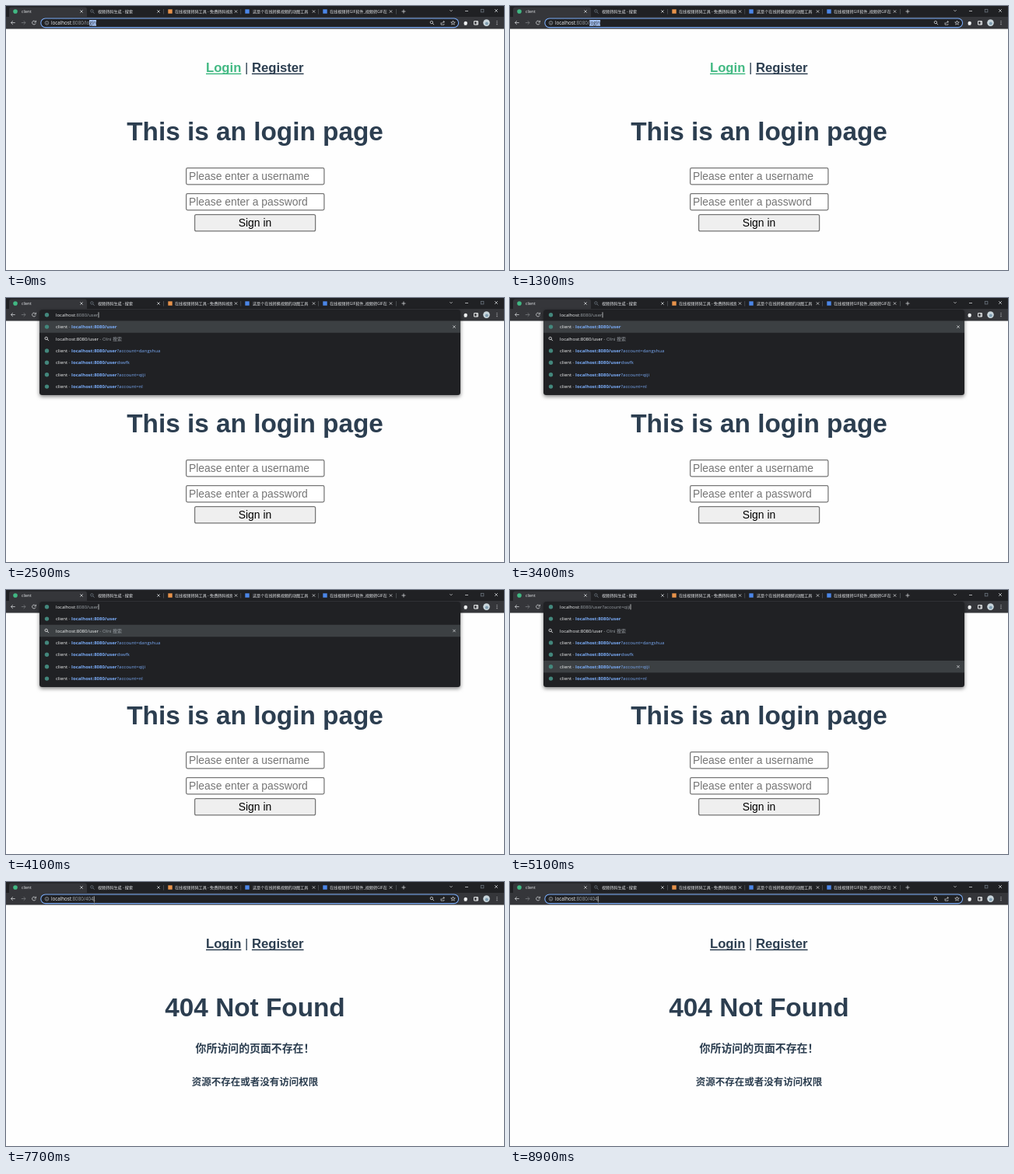
These frames come from a looping animation (640 px wide and 340 px high, 9000 ms). An HTML page with a canvas:

```html
<!DOCTYPE html>
<html lang="en">
<head>
<meta charset="utf-8">
<title>Login routing demo</title>
<style>
html, body { margin: 0; width: 100%; height: 100%; overflow: hidden; background: #fefefe; }
canvas { display: block; width: 640px; height: 340px; }
</style>
</head>
<body>
<canvas id="stage" width="640" height="340"></canvas>
<script>
const ctx = document.getElementById('stage').getContext('2d');
const LOOP = 9000;
const PAGE_FONT = '"Liberation Sans", Arial, sans-serif';
const UI_FONT = '"Open Sans", "Noto Sans CJK SC", sans-serif';
const CJK_FONT = '"Noto Sans CJK SC", "Noto Sans CJK", sans-serif';
const INK = '#2c3e50', GREEN = '#42b983', DARK = '#202124', BAR = '#35363a';
const WHITE = '#f1f3f4', GREY = '#9aa0a6', LINK = '#7aacf8', ICON = '#cfd1d4';
const HOST = 'localhost', PORT = ':8080/';
const ROW_H = 15.4;

// Time at which each typed prefix or arrow-key choice takes effect.
const TYPING = [[1500, 'u'], [1800, 'us'], [2100, 'use'], [2400, 'user']];
const ARROWS_START = 4000, ARROW_STEP = 200, LAST_CHOICE = 4;
const ENTER = 5300, REFOCUS = 7500;

function text(str, x, y, size, color, family = UI_FONT, weight = 400, align = 'left') {
  ctx.font = `${weight} ${size}px ${family}`;
  ctx.fillStyle = color;
  ctx.textAlign = align;
  ctx.fillText(str, x, y);
  return ctx.measureText(str).width;
}

// Draws [string, colour, weight] runs one after another; returns the end x.
function runs(parts, x, y, size) {
  for (const [str, color, weight] of parts) x += text(str, x, y, size, color, UI_FONT, weight);
  return x;
}

function rect(x, y, w, h, color) {
  ctx.fillStyle = color;
  ctx.fillRect(x, y, w, h);
}

function roundBox(x, y, w, h, r, fill, stroke, width = 1) {
  ctx.beginPath();
  ctx.roundRect(x, y, w, h, r);
  if (fill) { ctx.fillStyle = fill; ctx.fill(); }
  if (stroke) { ctx.strokeStyle = stroke; ctx.lineWidth = width; ctx.stroke(); }
}

function dot(x, y, r, color) {
  ctx.beginPath();
  ctx.arc(x, y, r, 0, Math.PI * 2);
  ctx.fillStyle = color;
  ctx.fill();
}

function ring(x, y, r, color, from = 0, to = Math.PI * 2) {
  ctx.beginPath();
  ctx.arc(x, y, r, from, to);
  ctx.strokeStyle = color;
  ctx.lineWidth = 0.8;
  ctx.stroke();
}

function path(d, x, y, color, width = 0.8) {
  ctx.save();
  ctx.translate(x, y);
  ctx.strokeStyle = color;
  ctx.lineWidth = width;
  ctx.stroke(new Path2D(d));
  ctx.restore();
}

function cross(x, y, r, color) {
  path(`M${-r} ${-r}L${r} ${r}M${r} ${-r}L${-r} ${r}`, x, y, color);
}

function magnifier(x, y, color) {
  ring(x - 0.6, y - 0.6, 1.7, color);
  path('M.7 .7L2.6 2.6', x, y, color, 0.9);
}

function underlined(str, x, y, color) {
  const w = text(str, x, y, 16.67, color, PAGE_FONT, 700);
  rect(x, y + 1.6, w, 1.5, color);
  return x + w;
}

function drawNav(active) {
  const gap = 4.63, y = 85;
  let x = underlined('Login', 257, y, active ? GREEN : INK) + gap;
  x += text('|', x, y, 16.67, INK, PAGE_FONT) + gap;
  underlined('Register', x, y, INK);
}

function heading(str) {
  text(str, 320, 173, 33.33, INK, PAGE_FONT, 700, 'center');
}

function input(y, hint) {
  roundBox(231.6, y + 0.6, 177.3, 21.3, 1.8, '#fff', '#767676', 1.25);
  text(hint, 235, y + 16, 13.89, '#757575', PAGE_FONT);
}

function drawLogin() {
  drawNav(true);
  heading('This is an login page');
  input(208, 'Please enter a username');
  input(241, 'Please enter a password');
  roundBox(242.6, 268.6, 155, 21.3, 2, '#efefef', '#767676', 1.25);
  text('Sign in', 320, 284, 13.89, '#000', PAGE_FONT, 400, 'center');
}

function drawNotFound() {
  drawNav(false);
  heading('404 Not Found');
  text('你所访问的页面不存在！', 320, 218.5, 13.9, INK, CJK_FONT, 700, 'center');
  text('资源不存在或者没有访问权限', 320, 262, 12.5, INK, CJK_FONT, 700, 'center');
}

function clippedTitle(str, x) {
  ctx.save();
  ctx.beginPath();
  ctx.rect(x, 0, 74, 14);
  ctx.clip();
  text(str, x, 9.1, 5.1, '#e4e6e9');
  ctx.restore();
}

function drawTabs() {
  rect(0, 0, 640, 14, DARK);
  roundBox(4, 1.5, 100, 14, [3, 3, 0, 0], BAR);
  dot(12, 7, 2.8, '#41b883');
  text('client', 20, 9.1, 5.1, '#e4e6e9');
  magnifier(111, 7, '#6d7680');
  clippedTitle('视频转码生成 - 搜索', 118);
  rect(208.3, 4.3, 5.4, 5.4, '#e8934a');
  clippedTitle('在线视频转码工具 - 免费转码视频', 217);
  rect(307.3, 4.3, 5.4, 5.4, '#4b86e8');
  clippedTitle('这是个在线转换视频的动图工具', 317);
  rect(407.3, 4.3, 5.4, 5.4, '#4b86e8');
  clippedTitle('在线视频转GIF软件_视频转GIF在', 416);
  for (const x of [97, 196, 295.5, 395.5, 494.5]) cross(x, 7, 1.7, ICON);
  for (const x of [202, 301.5, 401, 501]) rect(x, 4, 0.6, 6.5, '#5f6368');
  path('M-2.5 0H2.5M0-2.5V2.5', 511, 7, ICON);
  path('M-1.6-.8L0 .8L1.6-.8', 572, 6, ICON);
  path('M-2 0H2', 592, 6.5, ICON);
  ctx.strokeRect(610.3, 4.3, 3.6, 3.6);
  cross(630, 6, 1.9, ICON);
}

function drawToolbar() {
  rect(0, 14, 640, 15.5, BAR);
  path('M2.7 0H-2.5M-.2-2.4L-2.6 0L-.2 2.4', 9, 21.5, ICON);
  path('M-2.7 0H2.5M.2-2.4L2.6 0L.2 2.4', 22.5, 21.5, '#77797d');
  ring(36, 21.5, 2.4, ICON, 0.4, 5.4);
  path('M2.5-2.8V-.6H.3', 36, 21.5, ICON);
  dot(590.7, 22, 2.2, WHITE);
  rect(588.8, 21.6, 3.4, 3, WHITE);
  path('M-2.4-2.2H2.4V2.2H-2.4ZM1-2.2V2.2', 604, 21.8, WHITE, 1);
  dot(617.5, 21.6, 4.3, '#c9d6dc');
  dot(617.8, 22.6, 2, '#7f9db0');
  for (const y of [19.5, 21.6, 23.7]) dot(631, y, 0.6, ICON);
}

function urlParts(tail) {
  return [[HOST, WHITE, 400], [PORT + tail, GREY, 400]];
}

function caret(x, t, since) {
  if ((t - since) % 1000 < 500) rect(x + 0.2, 18.3, 0.7, 7, WHITE);
}

function drawAddress(t) {
  const onLogin = t < ENTER;
  const focused = onLogin || t >= REFOCUS;
  roundBox(44.8, 16, 536.8, 11.6, 5.8, DARK, focused ? LINK : null, 1.1);
  ring(52.5, 21.8, 2.3, GREY);
  path('M0-1.2V-.5M0 0V1.3', 52.5, 21.8, GREY);

  const tail = onLogin ? 'login' : '404';
  const end = runs(urlParts(tail), 58, 24, 6.2);
  if (onLogin) {
    const start = 107 - 4.9 * Math.min(1, t / 400);
    rect(start, 18, end - start, 7.6, '#a8c7fa');
    ctx.save();
    ctx.beginPath();
    ctx.rect(start, 17, end - start, 10);
    ctx.clip();
    runs([[HOST + PORT + tail, DARK, 400]], 58, 24, 6.2);
    ctx.restore();
  } else if (focused) {
    caret(end, t, REFOCUS);
    path('M-1.2-2.5H1.2M0-2.5V2.5M-1.2 2.5H1.2', 113.5, 26.5, '#85888c', 0.6);
  }

  magnifier(547.5, 21.6, ICON);
  path('M-2-.5V2.3H2V1M-1 1C-.6-.8 .4-1.4 2.4-1.4M1-2.8L2.5-1.4L1 0', 561, 21.8, ICON, 0.7);
  let star = '';
  for (let i = 0; i < 10; i++) {
    const a = i * Math.PI / 5, r = i % 2 ? 1.2 : 2.9;
    star += `${i ? 'L' : 'M'}${Math.sin(a) * r} ${-Math.cos(a) * r}`;
  }
  path(star + 'Z', 574.5, 21.8, ICON, 0.7);
}

function suggestions(typed) {
  const query = '?account=';
  return typed.length < 3
    ? ['user', null, `user${query}dangshua`, 'usr', `user${query}qiji`, 'useai']
    : ['user', null, `user${query}dangshua`, 'userdswfk', `user${query}qiji`, `user${query}nl`];
}

function drawRow(tail, i, typed, chosen) {
  const y = 37.1 + ROW_H * i;
  if (chosen) {
    rect(43, y - ROW_H / 2, 541, ROW_H, '#3c4043');
    cross(576, y, 1.7, ICON);
  }
  if (tail === null) {
    magnifier(52.3, y, WHITE);
    runs([[HOST + PORT + typed, WHITE, 400], [' - Olni 搜索', GREY, 400]], 64, y + 2, 6);
    return;
  }
  dot(52.5, y, 2.7, '#43877c');
  const link = [[HOST + PORT + typed, LINK, 700], [tail.slice(typed.length), LINK, 400]];
  const lead = tail === 'useai' ? [] : [['client', WHITE, 400], [' - ', GREY, 400]];
  runs([...lead, ...link], 64, y + 2, 6);
}

function drawDropdown(t) {
  const [since, typed] = TYPING.filter(([at]) => t >= at).pop();
  const choice = t < ARROWS_START ? 0
    : Math.min(LAST_CHOICE, 1 + Math.floor((t - ARROWS_START) / ARROW_STEP));
  const tails = suggestions(typed);

  ctx.save();
  ctx.shadowColor = 'rgba(0,0,0,.5)';
  ctx.shadowBlur = 5;
  ctx.shadowOffsetY = 2;
  roundBox(43, 15, 541, 110, 3.5, DARK);
  ctx.restore();

  dot(52.5, 21.8, 2.7, '#43877c');
  const shown = choice ? tails[choice] || typed : typed;
  const end = runs(urlParts(shown), 64, 24, 5.95);
  if (typed.length < 4) {
    const rest = 'user'.slice(typed.length);
    ctx.font = `400 5.95px ${UI_FONT}`;
    rect(end, 18, ctx.measureText(rest).width, 7.6, '#a8c7fa');
    text(rest, end, 24, 5.95, DARK);
  } else {
    caret(end, t, choice ? ARROWS_START : since);
  }
  tails.forEach((tail, i) => drawRow(tail, i, typed, i === choice));
}

function draw(t) {
  rect(0, 0, 640, 340, '#fefefe');
  if (t < ENTER) drawLogin(); else drawNotFound();
  drawTabs();
  drawToolbar();
  if (t >= TYPING[0][0] && t < ENTER) drawDropdown(t);
  else drawAddress(t);
}

const begin = performance.now();
function tick() {
  draw((performance.now() - begin) % LOOP);
  requestAnimationFrame(tick);
}
tick();
</script>
</body>
</html>
```
